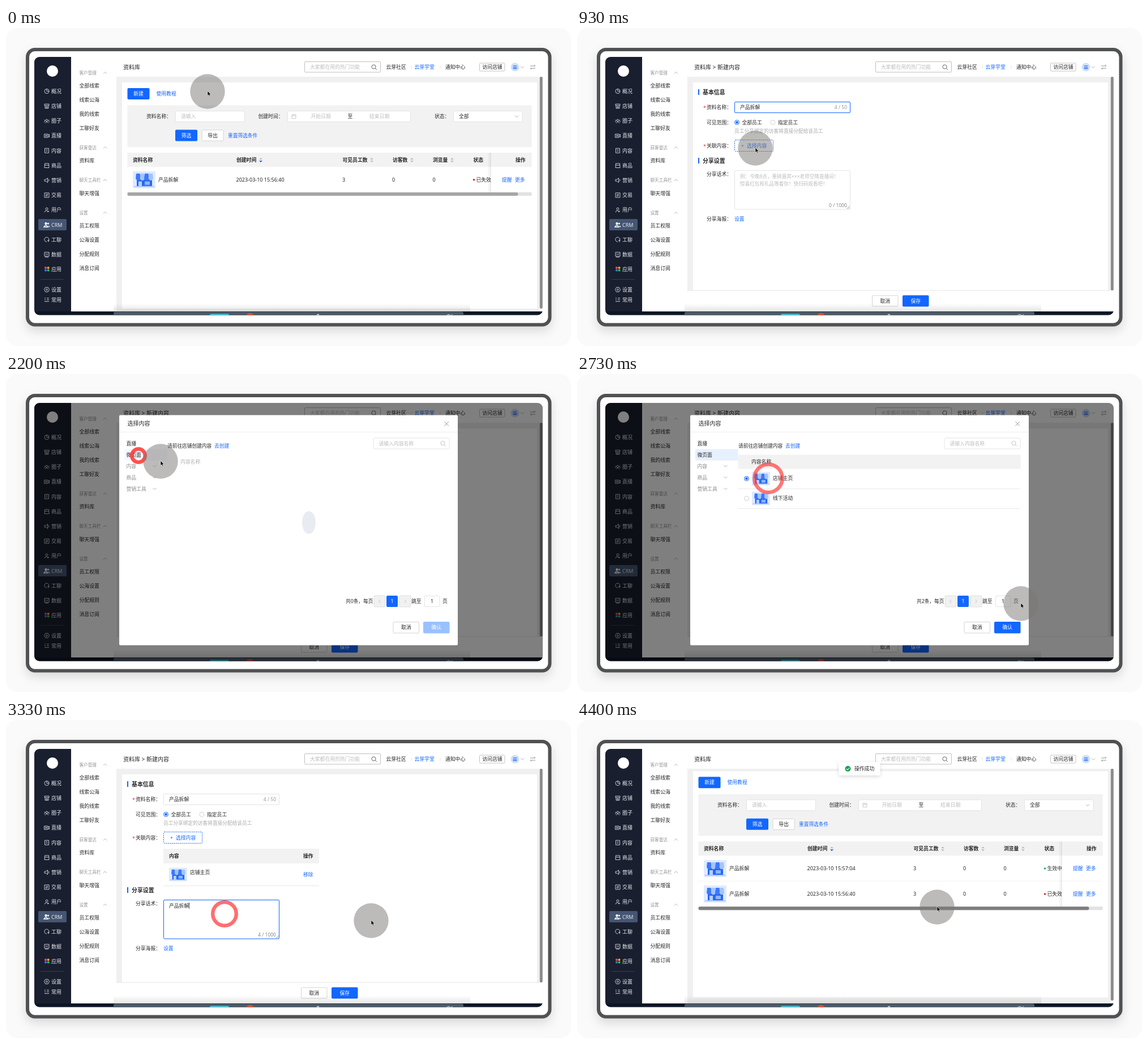
An HTML page that plays this animation: 998x561 px, repeating every 4470 ms.

```html
<!DOCTYPE html>
<html lang="zh-CN">
<head>
<meta charset="utf-8">
<title>资料库</title>
<style>
html,body{margin:0;width:100%;height:100%;overflow:hidden;background:#fff}
svg{display:block;width:100vw;height:100vh}
text{font-family:"Noto Sans","Noto Sans CJK SC","Noto Sans CJK",sans-serif;white-space:pre}
</style>
</head>
<body>
<svg id="stage" viewBox="0 0 998 561"></svg>
<script>
const BLUE = '#1267ff', INK = '#262626', PALE = '#bdbdbd', GREY = '#f2f2f2';

// Drawing helpers; text is placed by its vertical centre.
const text = (x, y, s, fill = INK, size = 8.8, extra = '') =>
  `<text x="${x}" y="${y + size * .36}" font-size="${size}" fill="${fill}" ${extra}>${s}</text>`;
const bold = (x, y, s, size = 8.8) => text(x, y, s, INK, size, 'font-weight="700"');
const mid = (x, y, s, fill, size) => text(x, y, s, fill, size, 'text-anchor="middle"');
const rect = (x, y, w, h, fill, extra = '') =>
  `<rect x="${x}" y="${y}" width="${w}" height="${h}" fill="${fill}" ${extra}/>`;
const box = (x, y, w, h, stroke = '#e4e4e4', id = '') =>
  rect(x + .5, y + .5, w - 1, h - 1, '#fff', `stroke="${stroke}" rx="1.5" ${id}`);
const line = (d, stroke = '#999', w = .9, extra = '') =>
  `<path d="${d}" fill="none" stroke="${stroke}" stroke-width="${w}" ${extra}/>`;
const dot = (x, y, r, fill, extra = '') => `<circle cx="${x}" cy="${y}" r="${r}" fill="${fill}" ${extra}/>`;
const group = (id, s, extra = '') => `<g id="${id}" ${extra}>${s}</g>`;
const button = (x, y, w, h, s, main, id = '') =>
  (main ? rect(x, y, w, h, BLUE, `rx="2" ${id}`) : box(x, y, w, h, '#d4d4d4')) +
  mid(x + w / 2, y + h / 2, s, main ? '#fff' : INK);
const chevron = (x, y, up, c = '#aaa') => line(`M${x - 3} ${y + (up ? 1.5 : -1.5)}l3 ${up ? -3 : 3}l3 ${up ? 3 : -3}`, c);
const lens = (x, y, c) => line(`M${x + 2.3} ${y + 2.3}l2.6 2.6`, c) + dot(x - .5, y - .5, 3.6, 'none', `stroke="${c}" stroke-width=".9"`);
const radio = (x, y, on, id = '') => dot(x, y, 4, '#fff', `stroke="${on ? BLUE : '#d0d0d0'}" ${id}`) + (on ? dot(x, y, 2.3, BLUE) : '');
const thumb = (x, y, w) => `<use href="#shop" x="0" y="0" transform="translate(${x} ${y}) scale(${w / 40})"/>`;

const defs = `<defs>
  <clipPath id="screen"><rect x="50" y="51" width="898" height="455.5" rx="9"/></clipPath>
  <clipPath id="view"><rect x="195" y="86" width="752" height="413.5"/></clipPath>
  <filter id="soft" x="-10%" y="-10%" width="120%" height="130%"><feDropShadow dx="0" dy="8" stdDeviation="9" flood-opacity=".13"/></filter>
  <filter id="toastShade" x="-30%" y="-50%" width="160%" height="220%"><feDropShadow dx="0" dy="2" stdDeviation="3" flood-opacity=".16"/></filter>
  <linearGradient id="dockShade" x1="0" y1="0" x2="0" y2="1"><stop offset="0" stop-color="#000" stop-opacity="0"/><stop offset="1" stop-color="#000" stop-opacity=".1"/></linearGradient>
  <linearGradient id="edge"><stop offset="0" stop-color="#000" stop-opacity="0"/><stop offset="1" stop-color="#000" stop-opacity=".08"/></linearGradient>
  <g id="shop">${rect(0, 0, 40, 30, '#e0eaff', 'rx="1"')}
    ${rect(7, 13, 27, 14, '#2468f5', 'rx="1"')}${rect(10, 18, 6, 9, '#b9d0ff')}${rect(21, 18, 9, 6, '#8fb5ff')}
    ${[0, 1, 2, 3].map(i => `<path d="M${6 + i * 7.5} 4h6.5l1 8a3.8 3.8 0 0 1-8.4 0Z" fill="${i % 2 ? '#a4c3ff' : '#3a79f8'}"/>`).join('')}
    ${rect(2, 26, 36, 1.6, '#a4c3ff')}</g>
</defs>`;

// Small line icons, each in a box from -5 to 5.
const icons = [
  'M0-4A4 4 0 1 0 4 0M0-4V0H4A4 4 0 0 0 0-4', 'M-4-3.5H4V-1H-4ZM-3-1V4H3V-1M-1 4V1H1V4',
  'M-1.8-1a1.8 1.8 0 1 0 3.6 0a1.8 1.8 0 1 0-3.6 0M-3 4Q0-.5 3 4M-4.8 2L-3 0L-4-2M4.8 2L3 0L4-2',
  'M-4.5-3H2V3H-4.5ZM2-1L4.5-2.5V2.5L2 1M-2-1.5V1.5L.3 0Z', 'M-3.5-4H3.5V4H-3.5ZM-1.5-1.5H1.5M-1.5 1H1.5',
  'M-3.5-3.5H3.5L4 4H-4ZM-4-.5H4', 'M-4-1.5H-1.5L1.5-4V4L-1.5 1.5H-4ZM3-2Q5 0 3 2', 'M-4-4H4V4H-4ZM-2-1H2L.5-2.5M2 1H-2L-.5 2.5',
  'M-2-2a2 2 0 1 0 4 0a2 2 0 1 0-4 0M-4 4Q-3 .5 0 1M2 1V4M.5 2.5H4', '',
  'M3 2A4 4 0 1 0 0 3.6M1 1.5H4.5M3 0V4', 'M-4-4H4V3H-4ZM-2.5 0L-1-1.5L.5.5L2.5-2M-3 4.5H3', '',
  'M-2.3-4H2.3L4.6 0L2.3 4H-2.3L-4.6 0ZM-1.5 0a1.5 1.5 0 1 0 3 0a1.5 1.5 0 1 0-3 0', 'M-4-3H-2M0-3H4M-4 0H-2M0 0H4M-4 3H4'];
const names = ['概况', '店铺', '圈子', '直播', '内容', '商品', '营销', '交易', '用户', 'CRM', '工聊', '数据', '应用', '设置', '常用'];

function sidebar() {
  let s = rect(50, 51, 65, 449, '#1a1f2f') + dot(82, 76, 10, '#fff') +
    rect(57, 337, 50, 20, '#455673', 'rx="2"') + line('M61 443.5H102', '#3a4152');
  names.forEach((n, i) => {
    const y = i < 13 ? 111.5 + i * 26.2 : 461.5 + (i - 13) * 18;
    if (icons[i]) s += line(icons[i], '#d8dbe2', .9, `transform="translate(72 ${y})"`);
    s += text(80, y, n, '#e6e8ee', 9);
  });
  s += dot(70.5, 345, 2.2, '#fff') + line('M67 351Q70.5 345.5 74 351Z', '#fff', 1.4) + dot(74.5, 345, 1.5, '#fff') + line('M75 349L77 351', '#fff', 1.2);
  ['#ff4d4f', '#ffb020', '#2f7bff', '#20c070'].forEach((c, i) => s += dot(70 + i % 2 * 4.6, 423 + (i >> 1) * 4.6, 2, c));
  return s;
}

function submenu() {
  const parts = [[79, '客户管理', 101.5, '全部线索', '线索公海', '我的线索', '工聊好友'], [211, '获客雷达', 234, '资料库'],
    [268.5, '聊天工具栏', 291.5, '聊天增强'], [326, '设置', 349, '员工权限', '公海设置', '分配规则', '消息订阅']];
  return rect(115, 51, 80, 449, '#fff') + parts.map(([y, head, first, ...items]) =>
    text(129.5, y, head, '#949494', 7.6) + chevron(175, y, true) +
    items.map((n, i) => text(129.5, first + i * 25, n, INK, 8.9)).join('')).join('');
}

const header = () => rect(195, 51, 753, 35, '#fff') + text(207, 69.5, '资料库', INK, 10, 'id="crumb"') +
  box(527, 59, 135, 19.5, '#bfbfbf') + text(537, 69, '大家都在用的热门功能', PALE) + lens(650, 69, '#555') +
  text(671.5, 69, '云芽社区') + text(721.5, 69, '云芽学堂', BLUE) + text(776, 69, '通知中心') +
  line('M716 66V72M767 66V72', '#e0e0e0') + box(836, 61.5, 45.5, 15, '#c2c2c2') + text(841.3, 69, '访问店铺') +
  dot(899, 69, 7.5, '#cfe0fb') + rect(895.5, 66, 7, 6.5, '#5b93f5', 'rx="1"') + line('M895 68.5H903', '#e7f0ff') +
  chevron(912, 69) + line('M926 67H935L932.5 64.7M935 71H926L928.5 73.3', '#888');

const sorter = (x, y, on) => `<path d="M${x - 3} ${y - 1}l3-3l3 3Z" fill="#bbb"/><path d="M${x - 3} ${y + 1}l3 3l3-3Z" fill="${on ? BLUE : '#bbb'}"/>`;

function row(y, date, status, colour) {
  return thumb(224, y - 15, 40) + text(269, y, '产品拆解') + text(406.5, y, date, INK, 9) + text(594, y, '3', INK, 9) +
    text(682, y, '0', INK, 9) + text(753.5, y, '0', INK, 9) + dot(826.5, y, 1.7, colour) + text(830.5, y, status) +
    text(876, y, '提醒', BLUE) + text(899, y, '更多', BLUE) + line(`M214 ${y + 22.3}H928`, '#ececec', .7);
}

function list(two) {
  const end = two ? 335 : 290, old = y => row(y, '2023-03-10 15:56:40', '已失效', '#e02020');
  return rect(205, 96, 733, 399, '#fff') + button(214.5, 106, 39, 20, '新建', true) + text(265.5, 116, '使用教程', BLUE) +
    rect(214.5, 136.5, 714, 73.5, GREY) + text(248, 156, '资料名称：') + box(299, 146, 123, 20) + text(309, 156, '请输入', PALE) +
    text(445.5, 156, '创建时间：') + box(497, 146, 218, 20) + line('M505 153H512V159.5H505ZM505 155H512M507 151.5V153M510 151.5V153', '#c4c4c4') +
    text(538.5, 156, '开始日期', PALE) + text(603.5, 156, '至') + text(642, 156, '结束日期', PALE) +
    text(757, 156, '状态：') + box(790, 146, 122.5, 20) + text(800, 156, '全部') + chevron(902, 156) +
    button(299, 179.5, 39, 20, '筛选', true) + button(345.5, 179.5, 39, 20, '导出') + text(392, 189.5, '重置筛选条件', BLUE, 8.7) +
    rect(214.5, 220, 714, 25, GREY) +
    [[224, '资料名称'], [407, '创建时间'], [594.5, '可见员工数'], [683, '访客数'], [754, '浏览量'], [825.5, '状态'], [900, '操作']]
      .map(([x, s]) => bold(x, 233, s)).join('') +
    [450, 646, 717, 788].map((x, i) => sorter(x, 233, !i)).join('') +
    (two ? row(267.7, '2023-03-10 15:57:04', '生效中', '#12b05c') + old(312.7) : old(267.7)) +
    rect(850, 220, 7, end - 220, 'url(#edge)') +
    rect(214.5, end, 714, 6, '#e2e2e2') + rect(214.5, end, 690, 6, two ? '#7e7e7e' : '#a6a6a6', 'rx="3"');
}

const section = (y, s) => rect(214, y - 5, 2, 10, BLUE) + bold(222, y, s, 9.9);
const label = (y, s, must) => (must ? text(223, y + 1, '*', '#e83030') : '') + text(229, y, s);

const form = () => rect(205, 96, 733, 404, '#fff') + section(113, '基本信息') + label(140, '资料名称：', true) +
  box(278, 130, 205, 20, '#e4e4e4', 'id="nameBox"') + text(288, 140, '', INK, 8.8, 'id="nameText"') +
  text(477, 140, '', '#999', 8.5, 'id="nameCount" text-anchor="end"') +
  label(166.5, '可见范围：') + radio(282.5, 166.5, true) + text(291.5, 166.5, '全部员工') + radio(346, 166.5) + text(355, 166.5, '指定员工') +
  text(278, 181.5, '员工分享绑定的访客将直接分配给该员工', '#aaa', 8.7) + label(208, '关联内容：', true) +
  rect(278.5, 197.5, 68, 20, '#fff', `rx="1.5" stroke="${BLUE}" stroke-dasharray="2 1.5"`) + text(290, 207.5, '+', BLUE) + text(300, 207.5, '选择内容', BLUE) +
  group('chosen', rect(278, 227, 275, 26, GREY) + bold(288, 240, '内容') + bold(525, 240, '操作') + thumb(288, 260.5, 32) +
    text(325, 268.5, '店铺主页') + text(525, 272.5, '移除', BLUE) + line('M278 292.5H553', '#e6e6e6')) +
  group('lower', section(234, '分享设置') + label(257.5, '分享话术：') + box(278, 251, 205, 69.5, '#e4e4e4', 'id="talkBox"') +
    group('talkHint', text(288, 261.5, '例：今晚8点，重磅嘉宾×××老师空降直播间！', PALE, 8.6) + text(288, 274.5, '惊喜红包和礼品等着你！快扫码观看吧！', PALE, 8.6)) +
    text(288, 261.5, '', INK, 8.8, 'id="talkText"') + line('M323.5 256V267', INK, .8, 'id="caret"') +
    text(477, 313, '', '#888', 8.5, 'id="talkCount" text-anchor="end"') + line('M477 319L481.5 314.5M480 319L481.5 317.5', '#777', .8) +
    label(337, '分享海报：') + text(278, 337, '设置', BLUE)) +
  rect(195, 463, 752, 37, '#fff') + line('M195 463H947', '#e4e4e4') + button(521, 471.5, 46.5, 20, '取消') + button(575, 471.5, 46.5, 20, '保存', true);

function menu(open) {
  const sub = open ? ['训练营pro', '音频', '视频', '专栏', '大专栏', '图文', '电子书', '会员', 'AI互动课'] : [];
  let y = 122.5, s = '';
  const put = (x, n, grey, up) => {
    s += text(x, y, n, grey ? '#8c8c8c' : INK) + (grey ? chevron(262.5, y, up) : '');
    y += 20;
  };
  put(212.5, '直播'); put(212.5, '微页面'); put(212.5, '内容', true, open);
  sub.forEach(n => put(216, n));
  put(212.5, '商品', true); put(212.5, '营销工具', true);
  return s;
}

const modal = () => rect(50, 51, 898, 456, '#000', 'opacity=".5"') + rect(200, 72.5, 598, 406, '#fff', 'rx="2"') +
  text(214.5, 87.5, '选择内容', INK, 10) + line('M774.5 84L782 91.5M782 84L774.5 91.5', '#888') + line('M200 102.5H798', '#ededed') +
  rect(209, 112.5, 75.5, 20, '#e7f0ff', 'id="pick"') + group('menuShut', menu(false)) + group('menuOpen', menu(true)) +
  text(285, 126.5, '请前往店铺创建内容', INK, 8.7) + text(368, 126.5, '去创建', BLUE) +
  box(648.5, 112.5, 135, 20) + text(658.5, 122.5, '请输入内容名称', PALE) + lens(772, 122.5, '#bbb') +
  rect(284.5, 142.5, 499, 25, GREY, 'id="headFill"') + text(308, 155, '内容名称', INK, 8.8, 'id="headText"') +
  group('empty', text(516.5, 274, '暂无数据', '#777')) + group('loading', '<ellipse cx="535" cy="262" rx="12" ry="20" fill="#e9ebf3"/>') +
  group('rows', radio(299.5, 184.5) + group('picked', radio(299.5, 184.5, true)) + thumb(309, 172.5, 32) + text(346, 183.5, '店铺主页') +
    line('M284 202.5H783M284 237.5H783', '#e8e8e8') + radio(299.5, 219.5) + thumb(309, 207.5, 32) + text(346, 218.5, '线下活动')) +
  text(600, 401, '', INK, 8.7, 'id="total"') + [650, 695].map(x => rect(x, 391, 20, 20, '#f1f1f1', 'rx="2" stroke="#dadada" stroke-width=".8"')).join('') +
  line('M661.5 398l-3 3l3 3M703.5 398l3 3l-3 3', '#bbb') + button(672, 391, 20, 20, '1', true) +
  text(716, 401, '跳至') + box(739, 391, 27.5, 20) + mid(752.5, 401, '1') + text(771, 401, '页') +
  button(683.5, 437, 46.5, 20.5, '取消') + button(737, 437, 46.5, 20.5, '确认', true, 'id="ok"');

const dock = () => rect(50, 500, 898, 7, '#0c1726') + rect(190, 500.5, 618, 9, '#4d5b68', 'rx="3"') +
  rect(360, 504.5, 34, 4, '#4fd3e6', 'rx="2"') + dot(431, 511, 8, '#d9573f') + dot(551, 507, 2.5, '#d9d9d9') + line('M778 507l4-1.5l3 1.5l4-1', '#cfd6dc', 1.4);

stage.innerHTML = defs + rect(0, 0, 998, 561, '#fff') + rect(0, 0, 998, 561, '#fafafa', 'rx="20"') +
  rect(38, 38, 922.5, 485.5, '#fff', 'rx="13" stroke="#505152" stroke-width="6" filter="url(#soft)"') +
  group('inside', dock() + rect(195, 86, 753, 414, '#f0f0f0') + sidebar() + submenu() +
    `<g clip-path="url(#view)">${group('listOld', list(false)) + group('listNew', list(true), 'transform="translate(0 -5.7)"') + group('form', form())}</g>` +
    rect(942.5, 86, 5.5, 414, '#fff', 'opacity=".8"') + group('bar', rect(942.8, 86, 5, 409, '#8b8b8b', 'rx="2" id="thumbBar"')) +
    header() + rect(190, 486, 630, 14, 'url(#dockShade)') + group('modal', modal()) +
    group('toast', rect(462.5, 74, 73, 23.5, '#fff', 'rx="2" filter="url(#toastShade)"') + dot(478.5, 86, 5, '#16a34f') + line('M476 86l2 2l3.2-3.6', '#fff', 1.1) + text(490, 86, '操作成功')),
    'clip-path="url(#screen)"') +
  dot(0, 0, 1, 'none', 'id="ring" stroke="#ff3434" stroke-width="6.5"') +
  group('cursor', dot(0, 0, 30.7, '#7d7874', 'opacity=".5"') +
    '<path id="arrow" d="M0-1V7.5L2 5.8L3.4 8.8L4.8 8.2L3.5 5.4H6Z" fill="#000" stroke="#fff" stroke-width=".6"/>' +
    '<path id="hand" d="M0 0Q1-1 2 0V4L6 5Q7 5.5 6.5 8L5.5 11H1L-2 7Q-2 5.5 0 6.5Z" fill="#fff" stroke="#222" stroke-width=".8"/>');

const $ = id => document.getElementById(id);
const show = (id, on) => $(id).style.display = on ? '' : 'none';
const set = (id, name, v) => $(id).setAttribute(name, v);
const put = (id, s) => { if ($(id).textContent !== s) $(id).textContent = s; };
const clamp = (v, a, b) => Math.max(a, Math.min(b, v));

// Pointer stops [tick, x, y] and clicks [tick, x, y].
const path = [[0, 356, 112], [2, 238, 117], [4, 240, 117], [6, 365, 140], [10, 365, 150], [14, 315, 212], [16, 315, 212], [18, 364, 225],
  [21, 222, 163], [24, 235, 180], [28, 542, 261], [31, 240, 148], [32, 234, 144], [33, 273, 154], [36, 338, 184], [39, 338, 184], [41, 784, 405],
  [42, 762, 447], [43, 762, 447], [47, 386, 342], [48, 386, 342], [50, 645, 354], [52, 799, 330], [55, 598, 482], [58, 598, 482], [63, 636, 330]];
const clicks = [[1.8, 234, 116], [5.8, 365, 140], [14.5, 314, 211], [21.43, 222, 163], [32.68, 234, 144], [39.29, 338, 184], [42.4, 761, 447], [48.71, 386, 342], [56.2, 598, 482]];

function pointer(k) {
  let i = path.findIndex(p => p[0] > k);
  if (i < 0) return path[path.length - 1].slice(1);
  const [a, x, y] = path[i - 1], [b, u, v] = path[i], p = (k - a) / (b - a);
  return [x + (u - x) * p, y + (v - y) * p];
}

function draw(k) {
  const onForm = k >= 4 && k < 59, word = '产品拆解';
  show('listOld', k < 4); show('form', onForm); show('listNew', k >= 59);
  put('crumb', onForm ? '资料库 > 新建内容' : '资料库');
  set('thumbBar', 'height', onForm ? 377 : 409);

  const n = clamp(Math.floor((k - 7) / 1.2), 0, 4);
  put('nameText', n ? word.slice(0, n) : '请输入');
  set('nameText', 'fill', n ? INK : PALE);
  put('nameCount', n + ' / 50');
  set('nameBox', 'stroke', k >= 6 && k < 43 ? BLUE : '#e4e4e4');

  const m = clamp((k - 48) * 2, 0, 4);
  show('chosen', k >= 44);
  set('lower', 'transform', `translate(0 ${k >= 44 ? 66 : 0})`);
  show('talkHint', !m); show('caret', m === 4);
  put('talkText', word.slice(0, m));
  put('talkCount', m + ' / 1000');
  set('talkBox', 'stroke', m ? BLUE : '#e4e4e4');

  const busy = k === 33 || k === 34, done = k >= 40, open = k >= 22 && k < 33;
  show('modal', k >= 15 && k < 44);
  set('modal', 'opacity', k === 15 || k === 43 ? .5 : 1);
  show('menuOpen', open); show('menuShut', !open);
  set('pick', 'y', k < 33 ? 112.5 : 132.5);
  set('pick', 'opacity', busy ? .45 : 1);
  show('headFill', !busy); set('headText', 'opacity', busy ? .35 : 1);
  show('empty', k < 33); show('loading', busy);
  show('rows', k >= 35); show('picked', done);
  put('total', `共${k < 35 ? 0 : 2}条，每页`);
  set('ok', 'fill', done ? BLUE : '#99c1ff');

  show('toast', k >= 60);
  set('toast', 'transform', `translate(0 ${-5 * clamp(62 - k, 0, 2)})`);
  set('toast', 'opacity', clamp((k - 59) / 3, 0, 1));

  set('cursor', 'transform', `translate(${pointer(k)})`);
  const hand = k >= 22 && k < 26;
  show('hand', hand); show('arrow', !hand);

  const hit = clicks.find(c => k >= c[0] && k < c[0] + 4.5);
  show('ring', hit);
  if (hit) {
    const p = (k - hit[0]) / 4.5;
    set('ring', 'cx', hit[1]); set('ring', 'cy', hit[2]);
    set('ring', 'r', 8.75 + 42 * p);
    set('ring', 'opacity', (1 - .55 * Math.sqrt(p)) * clamp((1 - p) * 4, 0, 1));
  }
}

const start = performance.now(), LOOP = 4470;
function tick() {
  const t = (performance.now() - start) % LOOP;
  draw(Math.min(66, Math.floor((t + 4) * 15 / 1000)));
  requestAnimationFrame(tick);
}
tick();
</script>
</body>
</html>
```
